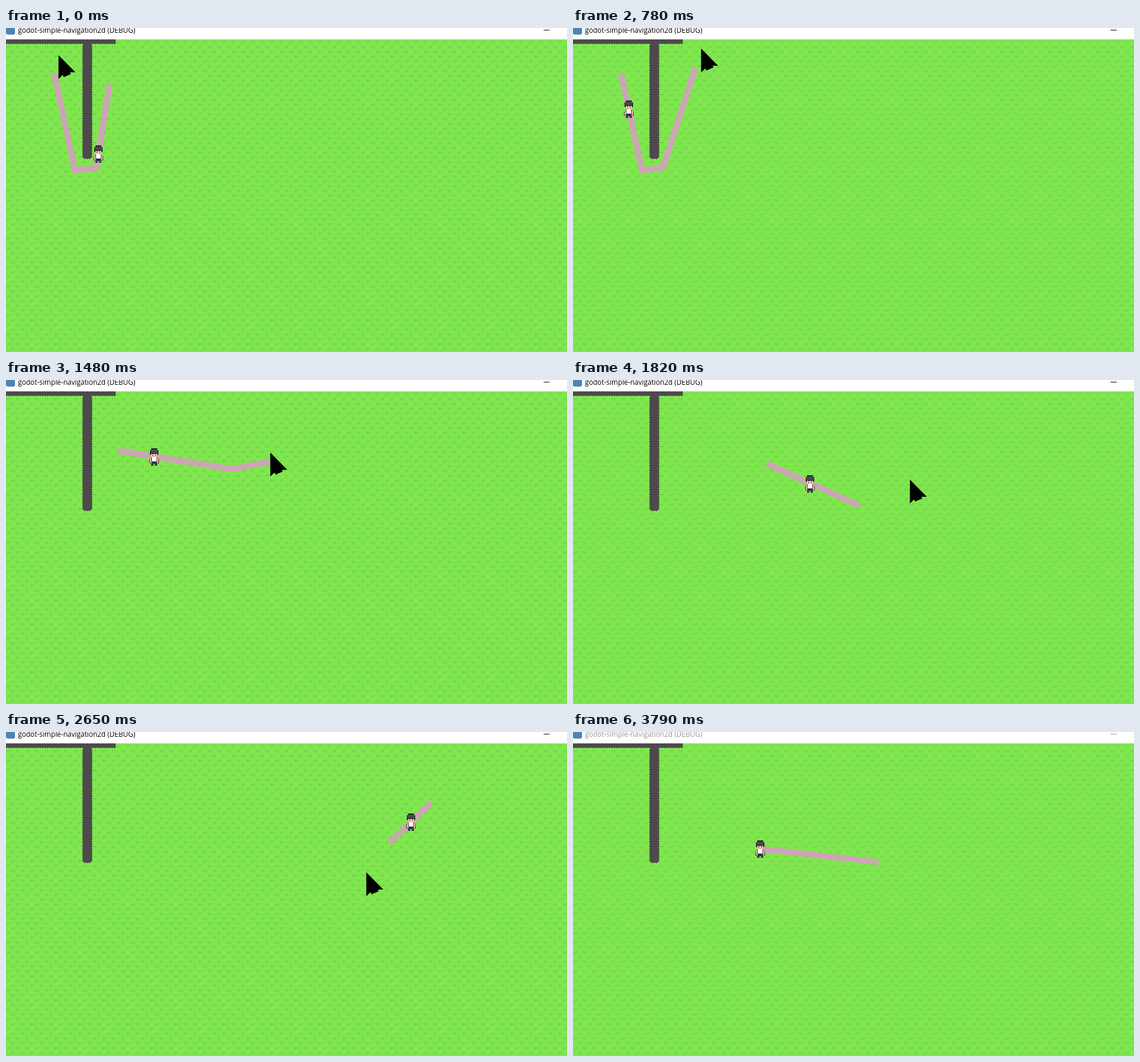
Write an HTML page with a canvas that moves like this. It is 935x541 px and loops after 3850 ms.

```html
<!DOCTYPE html>
<html lang="en">
<head>
<meta charset="utf-8">
<title>Navigation demo</title>
<style>
  html, body { margin: 0; width: 100%; height: 100%; overflow: hidden; }
  canvas { display: block; }
</style>
</head>
<body>
<canvas id="stage" width="935" height="541"></canvas>
<script>
const WIDTH = 935, HEIGHT = 541, BAR = 19, TILE = 16;
const LOOP = 3850, BLUR_TIME = 3790, CURSOR_EXIT = 3640;
const SPEED = 0.46; // pixels per ms
const ctx = document.getElementById('stage').getContext('2d');

function mix(a, b, part) {
  return [a[0] + (b[0] - a[0]) * part, a[1] + (b[1] - a[1]) * part];
}

// The point reached after walking a distance along a polyline.
function along(points, distance) {
  for (let i = 1; i < points.length; i++) {
    const [a, b] = [points[i - 1], points[i]];
    const length = Math.hypot(b[0] - a[0], b[1] - a[1]);
    if (distance < length) return mix(a, b, distance / length);
    distance -= length;
  }
  return points[points.length - 1];
}

const position = (route, time) => along(route.points, (time - route.click) * SPEED);

// Every click starts a new route at the walker's current position.
const routes = [{ click: -256, points: [[173, 93], [150, 233], [115, 238], [80, 75]] }];
function click(time, ...points) {
  const from = position(routes[routes.length - 1], time);
  routes.push({ click: time, points: [from, ...points] });
}
click(648, [115, 238], [150, 233], [204, 66]);
click(1350, [378, 149], [440, 136]);
click(1650, [478, 210]);
click(1922, [560, 99]);
click(2061, [743, 98]);
click(2394, [745, 116]);
click(2548, [639, 185]);
click(2728, [520, 232]);
click(2890, [382, 239]);
click(3049, [312, 195]);

// Turning points of the mouse: time and place.
const turns = [
  [0, [92, 57]], [540, [215, 43]], [780, [218, 46]], [1480, [445, 133]],
  [1700, [488, 211]], [2130, [764, 92]], [2250, [774, 70]], [2650, [606, 246]],
  [2790, [454, 246]], [3040, [297, 193]], [3200, [230, 185]], [3330, [258, 200]],
  [CURSOR_EXIT, [925, 541]]
];
function pointerAt(time) {
  const i = turns.findIndex(turn => turn[0] > time);
  const [[t0, from], [t1, to]] = [turns[i - 1], turns[i]];
  return mix(from, to, (time - t0) / (t1 - t0));
}

function box(c, colour, x, y, w, h) {
  c.fillStyle = colour;
  c.fillRect(x, y, w, h);
}

function tuft(c, x, y) {
  const blade = '#5cc63c';
  box(c, blade, x, y, 1, 2);
  box(c, blade, x + 1, y + 2, 1, 2);
  box(c, blade, x + 4, y, 1, 2);
  box(c, blade, x + 3, y + 2, 1, 1);
}

function makeField() {
  const field = document.createElement('canvas');
  field.width = WIDTH;
  field.height = HEIGHT;
  const c = field.getContext('2d');
  box(c, '#80e64f', 0, 0, WIDTH, HEIGHT);
  for (let y = BAR; y < HEIGHT; y += TILE) {
    for (let x = -9; x < WIDTH; x += TILE) {
      tuft(c, x + 2, y + 3);
      tuft(c, x + 10, y + 11);
    }
  }
  const wall = '#4d4a4d', edge = '#3f4a3c';
  box(c, wall, 0, BAR, 183, 7);
  c.fillStyle = wall;
  c.beginPath();
  c.roundRect(128, 22, 15, 196, 4);
  c.fill();
  for (let x = 0; x < 183; x += 4) box(c, edge, x, 26, 2, 1);
  for (let y = 30; y < 215; y += 4) {
    box(c, edge, 127, y, 1, 2);
    box(c, edge, 143, y, 1, 2);
  }
  for (let x = 130; x < 142; x += 4) box(c, edge, x, 218, 2, 1);
  return field;
}

function makeWalker() {
  const walker = document.createElement('canvas');
  walker.width = 16;
  walker.height = 29;
  const c = walker.getContext('2d');
  const dark = '#25232b', hair = '#4a4852', skin = '#f8c8aa', line = '#47343b';
  const bar = (colour, half, y, h) => box(c, colour, 8 - half, y, 2 * half, h);
  const pair = (colour, gap, y, w, h) => {
    box(c, colour, 8 - gap - w, y, w, h);
    box(c, colour, 8 + gap, y, w, h);
  };
  bar(dark, 5, 0, 15);
  bar(dark, 7, 3, 8);
  bar(hair, 5, 2, 6);
  bar(hair, 6, 4, 3);
  bar(skin, 5, 9, 6);
  pair(dark, 1, 8, 2, 2);
  pair(line, 2, 11, 1, 2);
  bar(line, 5, 15, 8);
  pair(line, 5, 18, 3, 7);
  pair(skin, 5, 18, 2, 6);
  bar('#fff', 4, 15, 8);
  bar('#302d3d', 4, 22, 4);
  pair('#302d3d', 1, 25, 4, 4);
  pair('#d89a8e', 2, 26, 1, 1);
  return walker;
}

const field = makeField(), walker = makeWalker();
const arrow = new Path2D('M.5 .5V16.5L4.2 12.9L6.8 18.6L9.4 17.5L6.9 11.9H11.8Z');

function drawRoute({ points }) {
  ctx.beginPath();
  for (const point of points) ctx.lineTo(...point);
  ctx.strokeStyle = 'rgba(209, 162, 187, .94)';
  ctx.lineWidth = 10;
  ctx.stroke();
}

function drawTitleBar(ink) {
  box(ctx, '#fff', 0, 0, WIDTH, BAR);
  ctx.fillStyle = '#4c84b4';
  ctx.beginPath();
  ctx.roundRect(0, -4, 15, 15, 3);
  ctx.fill();
  ctx.fillStyle = ink;
  ctx.font = '11.7px "Open Sans", "Noto Sans", sans-serif';
  ctx.fillText('godot-simple-navigation2d (DEBUG)', 20, 8);
  box(ctx, ink, 896, 3, 10, 1);
}

function drawPointer([x, y]) {
  ctx.save();
  ctx.translate(Math.round(x), Math.round(y));
  ctx.fillStyle = '#fff';
  ctx.strokeStyle = '#000';
  ctx.fill(arrow);
  ctx.stroke(arrow);
  ctx.restore();
}

function draw(time) {
  const route = routes.findLast(({ click }) => click <= time);
  const [x, y] = position(route, time);
  ctx.drawImage(field, 0, 0);
  drawRoute(route);
  ctx.drawImage(walker, Math.round(x) - 8, Math.round(y) - 14);
  drawTitleBar(time < BLUR_TIME ? '#000' : '#999');
  if (time < CURSOR_EXIT) drawPointer(pointerAt(time));
}

const start = performance.now();
function tick() {
  draw((performance.now() - start) % LOOP);
  requestAnimationFrame(tick);
}
tick();
</script>
</body>
</html>
```
